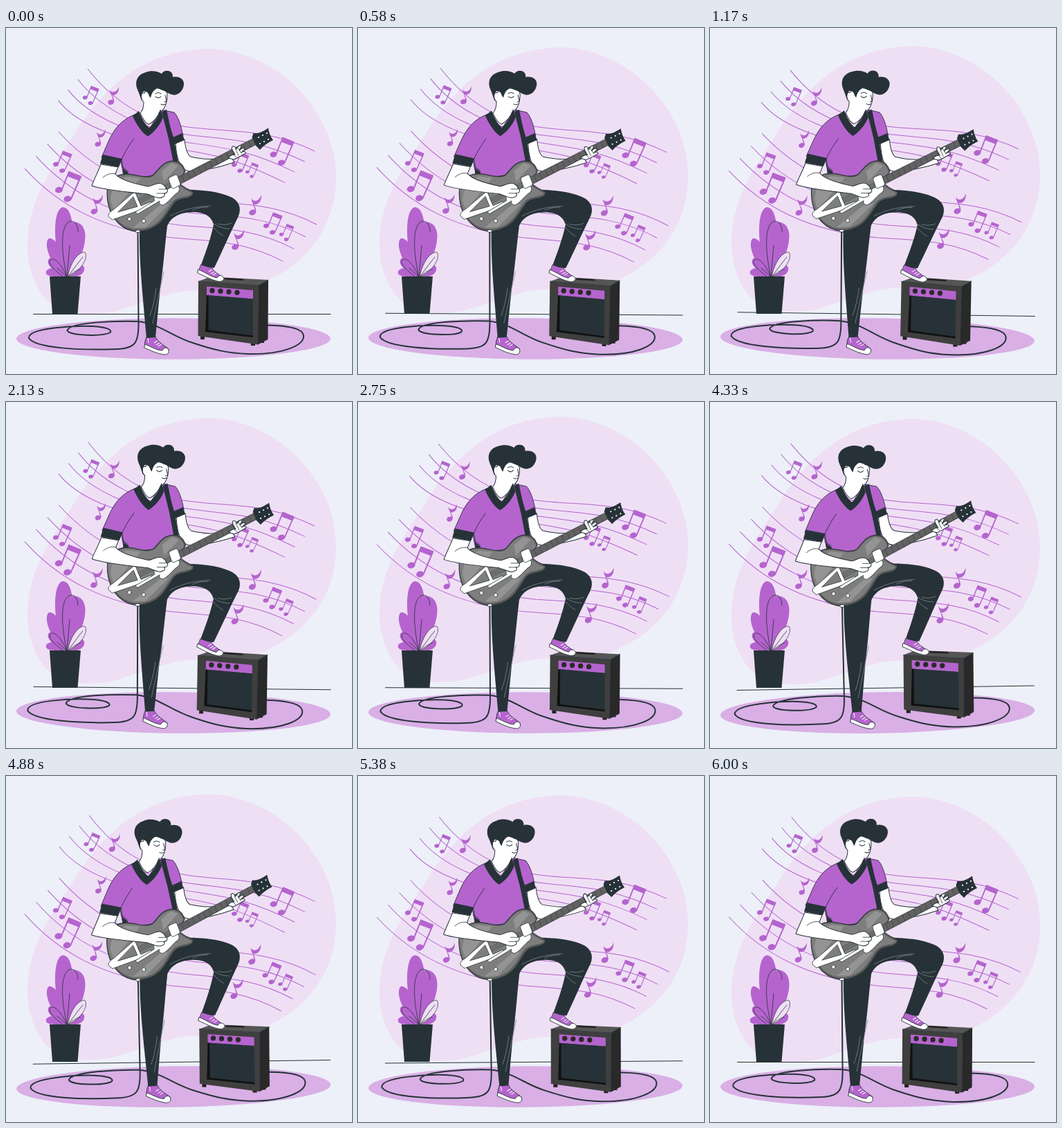
An HTML page for the animation above (6.04 s loop, 500 by 500 pixels).

```html
<!DOCTYPE html>
<html lang="en">
<head>
<meta charset="utf-8">
<title>Guitarist</title>
<style>
html, body { margin: 0; width: 100%; height: 100%; overflow: hidden; background: #edf0f8; }
svg { display: block; width: 100%; height: 100%; }
.p { fill: #b564ce; }
.d { fill: #263238; }
.w { fill: #fff; }
.o { stroke: #263238; stroke-linejoin: round; stroke-linecap: round; }
.l { fill: none; stroke: #263238; stroke-linecap: round; stroke-linejoin: round; }
.g { fill: none; stroke: #7d868a; stroke-width: .8; stroke-linecap: round; }
</style>
</head>
<body>
<svg viewBox="0 0 500 500">
  <defs>
    <g id="pair" class="p">
      <ellipse cx="-12.500" cy="4" rx="5.600" ry="4.400" transform="rotate(-12 -12.500 4)"/>
      <ellipse cx="0" cy="17" rx="5.600" ry="4.400" transform="rotate(-12 0 17)"/>
      <path d="M-8.500 4L2-22L19-15L4.500 18" fill="none" stroke="#b564ce" stroke-width="2"/>
      <path d="M2-23L20-16L17-9L-1-16Z"/>
    </g>
    <g id="single" class="p">
      <ellipse cx="-3.800" cy="10.500" rx="5" ry="4" transform="rotate(-20 -3.800 10.500)"/>
      <path d="M-6-10C-2-4 6-5 9-15C10-5 4 0-2-1C0 2 1.500 6 1.500 10L-.5 10C0 3-4-2-6-10Z"/>
    </g>
  </defs>

  <path id="blob" fill="#efdff5" d="M290 30C390 30 477 120 477 215C477 300 420 350 366 370C330 380 300 378 262 380C215 386 180 406 145 412C100 418 70 410 52 385C25 345 25 295 45 245C62 204 83 180 103 146C140 90 195 33 290 30Z"/>
  <g id="music"></g>
  <g id="ground">
    <ellipse cx="242" cy="449" rx="227" ry="29.700" fill="#d9afe6"/>
    <path class="l" stroke-width="1" d="M39.500 413.500H469"/>
  </g>

  <!-- plant -->
  <path class="p" d="M86 360C70 335 64 263 82 259C101 260 98 310 90 360Z"/>
  <path class="p" d="M88 360C78 330 77 284 97 280C124 281 118 322 91 360Z"/>
  <path class="p" d="M88 360C64 345 53 311 62 304C75 302 86 335 88 360Z"/>
  <path class="p" d="M86 360C76 358 55 362 58 351C66 342 80 349 88 360Z"/>
  <path class="p" d="M86 360C64 350 56 338 63 333C73 330 84 345 88 360Z"/>
  <path class="p" d="M88 360C95 343 108 337 113 346C115 356 103 361 90 360Z"/>
  <path d="M89 360C93 338 105 323 114 324C120 333 107 352 89 360Z" fill="#efdff5" stroke="#263238" stroke-width=".7"/>
  <path class="l" stroke-width=".8" d="M88 360C80 325 77 282 94 279C101 279 104 287 104 294M88 360L92 314M88 360C78 335 64 328 63 339C65 346 75 353 82 359M88 360Q77 349 74 347M89 360Q105 338 111 331M89 360Q99 351 107 348"/>
  <path class="d" d="M63 359H108L103.500 413H67Z"/>

  <g id="player">
    <path class="l" stroke-width="2" d="M190.500 294L191.500 425C192 455 187 463 160 464C110 466 42 463 33 448C32 433 100 430 125 431C145 432 154 436 150.500 440C140 446 91 445 88.500 437C92 425 160 423 190 424C222 427 240 446 270 455C300 465 320 470 350 471C402 472 432 458 430 444C428 433 402 430 378 429.500"/>

    <!-- amplifier -->
    <path d="M281 444h6v6h-6zM354 453h6v6h-6zM368 450h5v5h-5z" fill="#222"/>
    <path d="M278 366L296 359.500L379 364L365 372Z" fill="#555"/>
    <path d="M278 366L365 372L364 457.500L277.500 445Z" fill="#3f3f3f"/>
    <path d="M365 372L379 364L378.500 450L364 457.500Z" fill="#292929"/>
    <path class="l" stroke-width=".8" d="M278 366L365 372L379 364M365 372L364 457"/>
    <path d="M315 361L342 362.500L344 365L317 363.500Z" fill="#222"/>
    <path class="p" d="M290 373.500L357 379V391.500L290 386Z"/>
    <path class="d" d="M290 386L357 391.500L357 447L289 438.500Z"/>
    <path d="M290 386L292.500 386.500V436.500L357 444.500V447L288 439Z" fill="#111"/>
    <g fill="#2a2a2a"><circle cx="298" cy="379.500" r="3.700"/><circle cx="310" cy="380.300" r="3.700"/><circle cx="322" cy="381.200" r="3.700"/><circle cx="334" cy="382.200" r="3.700"/></g>

    <!-- shoes -->
    <path class="p o" stroke-width=".9" d="M203 447L216 446C219 454 228 458 235 464L234 470L201 460C200 455 201 451 203 447Z"/>
    <path class="w o" stroke-width=".9" d="M201 457C211 461 218 466 226 466C228 461 233 461 235 465C236 470 233 472 229 472C219 471 209 466 200 462Z"/>
    <path d="M214 455L219 452M217 458L222 455M220 460L225 457M205 448L206 455" stroke="#fff"/>
    <path class="p o" stroke-width=".9" d="M282 342L297 346C300 352 308 356 314 361L312 366L278 353Z"/>
    <path class="w o" stroke-width=".9" d="M278 349C288 353 297 360 305 361C308 356 313 357 315 362C314 366 310 367 306 366C296 364 286 358 277 354Z"/>
    <path d="M293 352L298 349M296 355L301 352M299 357L304 354" stroke="#fff"/>

    <!-- trousers -->
    <path class="d" d="M193 288L245 234C275 233 303 235 322 243C338 249 342 262 334 276C325 294 312 324 301 346.500C296 347 288 345 282 342C289 323 296 304 300 284C297 273 289 267 273 266C256 266 240 270 233 286C229 320 227 350 223 375L216 447L203 448C199 400 192 340 193 288Z"/>
    <path class="g" d="M228 352C222 380 217 402 212 427M217 376Q214 400 208 416M237 272C255 262 275 258 295 257M270 263Q282 258 292 259M299 282C307 288 315 290 323 290M299 287Q307 297 314 300M306 283Q316 286 326 282"/>

    <!-- far arm -->
    <path class="w o" stroke-width="1" d="M245 166L258 161C259 172 262 183 267 186C285 190 300 191 326 187L330 194C310 201 285 206 266 207C250 206 246 185 245 166Z"/>

    <!-- shirt -->
    <path class="p o" stroke-width=".9" d="M186 125C166 133 156 146 148 164L138 187L166 193L170 213L175 217L250 210L243 165L256 156C253 141 249 128 243 122L224 118L206 148Z"/>
    <path class="d" d="M140 183L168 189L163 201L136 196ZM239 159L254.500 152L258 162L244 168Z"/>
    <path class="l" stroke-width=".9" d="M184 161C176 172 171 181 167 190L171 211M167 200L176 207"/>
    <path class="d" d="M169 203L177 209L174 216L169 211Z"/>

    <!-- head -->
    <path class="w o" stroke-width="1" d="M200 94C194 92 194 102 199 107C199 114 198 119 194 123C198 132 203 139 207 139C214 135 219 129 222 121C229 119 233 109 233 96L231 86L205 86Z"/>
    <path class="d" d="M192 120L183 127C189 141 198 153 205 156.500C214 151 223 140 227 129L223 117C220 130 213 139 207 144C200 138 196 130 192 120Z"/>
    <path class="d" d="M225 121L232 118C235 132 237 143 242 158L250 200H243L235 160Z"/>
    <path class="d" d="M197 107C194 101 193 95 190 89C185 76 191 67 202 64C209 61 219 62 225 66C229 59 242 61 241 71C250 69 258 74 257 82C256 92 247 99 239 96C233 94 230 91 226 90C222 88 219 87 217 88C212 91 210 96 209 101C206 98 206 94 204 93C198 88 194 95 197 107Z"/>
    <path class="l" stroke-width="1" d="M216 95Q220 92 224 95M216 99Q220 103 224 99M230 97L232 106L229 107M224 110Q227 112 230 110"/>

    <!-- guitar -->
    <path d="M146 240C145 220 160 210 176 211C192 212 203 219 213 212C221 204 226 193 241 192C252 192 257 200 259 207L250 223C257 232 265 233 271 237C272 243 264 246 256 247C248 248 243 252 240 258C231 270 226 287 200 293C170 299 147 275 146 240Z" fill="#5c5c5c" class="o" stroke-width="1"/>
    <path d="M147 240C146 221 160 212 176 212.500C192 213 204 220 214 213C222 205 227 195 240 194C251 194 255 201 257 208L247 224C254 232 263 235 269 239C264 245 249 242 241 251C229 266 224 285 199 290C172 296 148 273 147 240Z" fill="#7e7e7e"/>
    <path d="M151 250C151 233 159 222 174 215L194 217L156 264ZM225 207L239 195L249 199L228 222ZM183 289L225 254L235 255L202 288Z" fill="#949494"/>
    <path class="w o" stroke-width=".8" d="M148 272C147 267 152 265 156 262L184 238L187 238L195 257L209 251L212 255L194 263L154 277ZM162 266L190 258L184 244Z" fill-rule="evenodd"/>
    <path class="w o" stroke-width=".8" d="M214 242L241 229C249 225 253 231 249 237C241 242 237 250 229 255C224 258 220 253 222 250L190 269L187 266L214 250Z"/>
    <path d="M245 217.500L357.500 159.500L361 168.500L250 226.500Z" fill="#707070" class="o" stroke-width=".8"/>
    <g id="strings" fill="none" stroke="#333" stroke-width=".55"></g>
    <path class="w o" stroke-width=".8" d="M236 216L245 212Q247 212 248 214L252 225Q252 227 250 228L242 232Q240 232 239 230L235 219Q235 217 236 216Z"/>
    <path class="d" d="M355.500 158L357.500 152C366 153 372 149 379 144.500C380 151 382 157 386 162C378 166 372 170 367 176L361 170Z"/>
    <g class="w"><circle cx="365" cy="158" r="1.100"/><circle cx="371" cy="155" r="1.100"/><circle cx="377" cy="152" r="1.100"/><circle cx="367" cy="167" r="1.100"/><circle cx="373" cy="164" r="1.100"/><circle cx="379" cy="161" r="1.100"/></g>
    <g class="w o" stroke-width=".8"><circle cx="178.500" cy="276" r="2.700"/><circle cx="199" cy="279" r="2.700"/><rect x="187.500" y="292" width="6" height="3.500" rx="1"/></g>

    <!-- hands and near arm -->
    <path class="w o" stroke-width="1" d="M322 188L329 190C335 188 341 184 346 181C347 178 343 178 340 180L345 175C344 172 340 174 337 177L340 171C338 168 335 171 333 175L331 172C328 169 325 172 327 176L331 183C327 183 323 184 322 188Z"/>
    <path class="l" stroke-width=".8" d="M331 174L336 184M335 173L340 181M329 183L333 187"/>
    <path class="w o" stroke-width="1" d="M137 197C133 208 127 219 124 228C140 234 175 237 204 240C214 243 221 248 227 244C230 243 230 240 228 239C234 239 235 234 231 232C230 227 224 223 218 225C213 226 209 229 205 229C185 225 165 220 158 211L162 201Z"/>
    <path class="l" stroke-width=".8" d="M158 211C151 209 145 212 140 216M218 239L228 239M221 233L231 233"/>
  </g>
</svg>
<script>
const $ = id => document.getElementById(id);
const LOOP = 6040;
const range = n => [...Array(n).keys()];

// Four lines through six points; ends and middle are spaced differently
const staff = (points, end, mid) => range(4).map(k => {
  const p = points.map(([x, y], i) => {
    const [dx, dy] = i > 1 && i < 5 ? mid : end;
    return `${x + dx * k} ${y + dy * k}`;
  });
  return `<path d="M${p[0]}C${p.slice(1, 4)} ${p.slice(4)}" fill="none" stroke="#b564ce"/>`;
}).join('');
const notes = (id, list) => list.map(([x, y, s]) =>
  `<use href="#${id}" transform="translate(${x} ${y}) scale(${s})"/>`).join('');

$('music').innerHTML =
  staff([[118, 59], [150, 100], [195, 133], [255, 142], [320, 152], [372, 142], [446, 178]],
    [-14.2, 15.2], [-5, 10.5]) +
  staff([[76, 150], [124, 203], [189, 239], [289, 250], [349, 255], [394, 255], [449, 284]],
    [-16.3, 17.7], [-16.3, 17.7]) +
  notes('pair', [[122, 98, .62], [89, 230, 1], [81, 194, .72], [398, 179, .92],
    [338, 195, .66], [355, 206, .5], [385, 283, .72], [405, 296, .56]]) +
  notes('single', [[155, 98, .88], [136, 159, .85], [131, 255, .97], [360, 256, 1], [335, 306, 1]]);

$('strings').innerHTML =
  range(4).map(i => `<path d="M${190 + i} ${247.5 + i * 2}L${358 + i} ${161.5 + i * 2}"/>`).join('') +
  range(13).map(i => `<path d="M${254 + i * 8} ${213 - i * 4.15}l4 9"/>`).join('');

// Linear swing 0, 1, 0, -1, 0 over each period
const swing = (t, period) => {
  const u = t / period % 1;
  return u < .25 ? 4 * u : u < .75 ? 2 - 4 * u : 4 * u - 4;
};
const move = (id, value) => $(id).setAttribute('transform', value);

function draw(now) {
  const t = now % LOOP;
  const sway = swing(t, LOOP);
  move('blob', `translate(0 ${-10 * (1 - Math.abs(1 - 2 * t / LOOP))})`);
  move('music', `rotate(${swing(t, LOOP / 4)} 238 198)`);
  move('ground', `rotate(${sway} 242 446)`);
  move('player', `rotate(${sway} 251 267)`);
  requestAnimationFrame(draw);
}
draw(performance.now());
</script>
</body>
</html>
```
